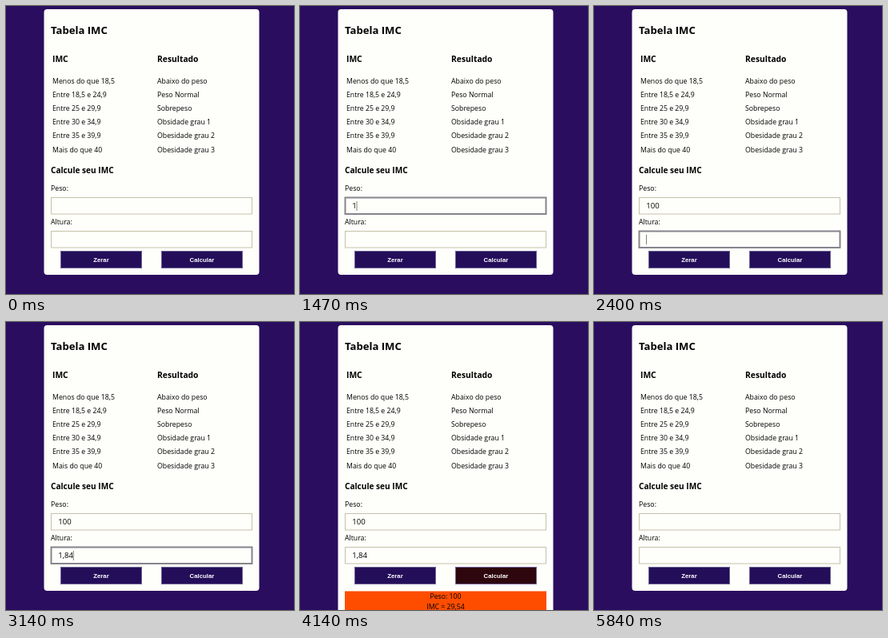
Recreate the animation shown at these times as an HTML page. Size 360 by 360 pixels, loop 6.35 s.

```html
<!DOCTYPE html>
<html lang="pt">
<head>
<meta charset="utf-8">
<title>Tabela IMC</title>
<style>
  html, body { margin: 0; width: 100%; height: 100%; overflow: hidden; background: #2a0d5e; }
  svg { display: block; width: 100vw; height: 100vh; }
  text { font: 8.75px "Open Sans", sans-serif; fill: #000; white-space: pre; }
  .title { font-size: 13.1px; font-weight: 700; }
  .column { font-size: 10.3px; font-weight: 700; }
  .section { font-size: 10.1px; font-weight: 700; }
  .value { font-size: 9.6px; }
  .label { font: 700 7.8px "Liberation Sans", Arial, sans-serif; fill: #fff; }
  .label, .result { text-anchor: middle; }
</style>
</head>
<body>
<svg id="stage" viewBox="0 0 360 360"></svg>
<script>
const LOOP = 6350;
const BLINK = 550;

// Focus moves from field to field to button; each entry is when it arrives.
const FOCUS = { weight: 30, height: 2100, clear: 3300, calc: 3870, clearAgain: 4640 };
const SOLVE = 4140;
const RESET = 5410;

const PAGE = '#2a0d5e';
const BUTTON = '#240e5a';
const BUTTON_FOCUS = '#2d070d';
const stage = document.getElementById('stage');

function add(tag, attrs, content = '', parent = stage) {
  const node = document.createElementNS('http://www.w3.org/2000/svg', tag);
  for (const key in attrs) node.setAttribute(key, attrs[key]);
  node.textContent = content;
  return parent.appendChild(node);
}
const write = (x, y, content, cls = '', parent = stage) =>
  add('text', { x, y, class: cls }, content, parent);
const show = (node, visible) =>
  node.setAttribute('visibility', visible ? 'visible' : 'hidden');
const within = (t, from, to) => t >= from && t < to;

add('rect', { width: 360, height: 360, fill: PAGE });
const card = add('rect', { x: 47.5, y: 4, width: 269, height: 332, rx: 4, fill: '#fefefb' });

write(56, 35, 'Tabela IMC', 'title');
write(58, 70, 'IMC', 'column');
write(189, 70, 'Resultado', 'column');
[
  ['Menos do que 18,5', 'Abaixo do peso'],
  ['Entre 18,5 e 24,9', 'Peso Normal'],
  ['Entre 25 e 29,9', 'Sobrepeso'],
  ['Entre 30 e 34,9', 'Obsidade grau 1'],
  ['Entre 35 e 39,9', 'Obesidade grau 2'],
  ['Mais do que 40', 'Obesidade grau 3']
].forEach(([range, result], i) => {
  const y = Math.floor(97 + 17.2 * i);
  write(58, y, range);
  write(189, y, result);
});
write(56, 209, 'Calcule seu IMC', 'section');

// Each field types its text at the given key times.
function makeField(label, y, text, focusAt, blurAt, keys) {
  write(56, y - 8, label);
  const border = add('rect', { x: 56.5, y: y + .5, width: 251, height: 20.5, fill: 'none' });
  const value = write(65.2, y + 14, '', 'value');
  const caret = add('rect', { y: y + 5, width: 1, height: 12, fill: '#84816c' });
  return t => {
    const focused = within(t, focusAt, blurAt);
    const typed = t < RESET ? keys.filter(k => t >= k).length : 0;
    const lastAction = typed ? keys[typed - 1] : focusAt;
    value.textContent = text.slice(0, typed);
    border.setAttribute('stroke', focused ? '#87848c' : '#c6c3a8');
    border.setAttribute('stroke-width', focused ? 2 : 1);
    caret.setAttribute('x', 65 + (typed ? value.getComputedTextLength() : 0));
    show(caret, focused && (t - lastAction) % (2 * BLINK) < BLINK);
  };
}

function makeButton(x, label) {
  const box = add('rect', { x, y: 306.5, width: 101, height: 21, stroke: '#6f6494' });
  write(x + 50.5, 320, label, 'label');
  return focused => box.setAttribute('fill', focused ? BUTTON_FOCUS : BUTTON);
}

const fields = [
  makeField('Peso:', 239, '100', FOCUS.weight, FOCUS.height, [1400, 1630, 1800]),
  makeField('Altura:', 281, '1,84', FOCUS.height, FOCUS.clear, [2640, 2780, 2930, 3080])
];
const clearButton = makeButton(68.5, 'Zerar');
const calcButton = makeButton(194.5, 'Calcular');

const result = add('g', {});
add('rect', { x: 56, y: 336.5, width: 252, height: 24, fill: '#ff4d00' }, '', result);
write(182, 346, 'Peso: 100', 'result', result);
write(182, 359, 'IMC = 29,54', 'result', result);

function render(t) {
  const solved = within(t, SOLVE, RESET);
  fields.forEach(update => update(t));
  clearButton(within(t, FOCUS.clear, FOCUS.calc) || within(t, FOCUS.clearAgain, RESET));
  calcButton(within(t, FOCUS.calc, FOCUS.clearAgain));
  card.setAttribute('height', solved ? 370 : 332);
  show(result, solved);
}

const start = performance.now();
function tick() {
  render((performance.now() - start) % LOOP);
  requestAnimationFrame(tick);
}
tick();
</script>
</body>
</html>
```
